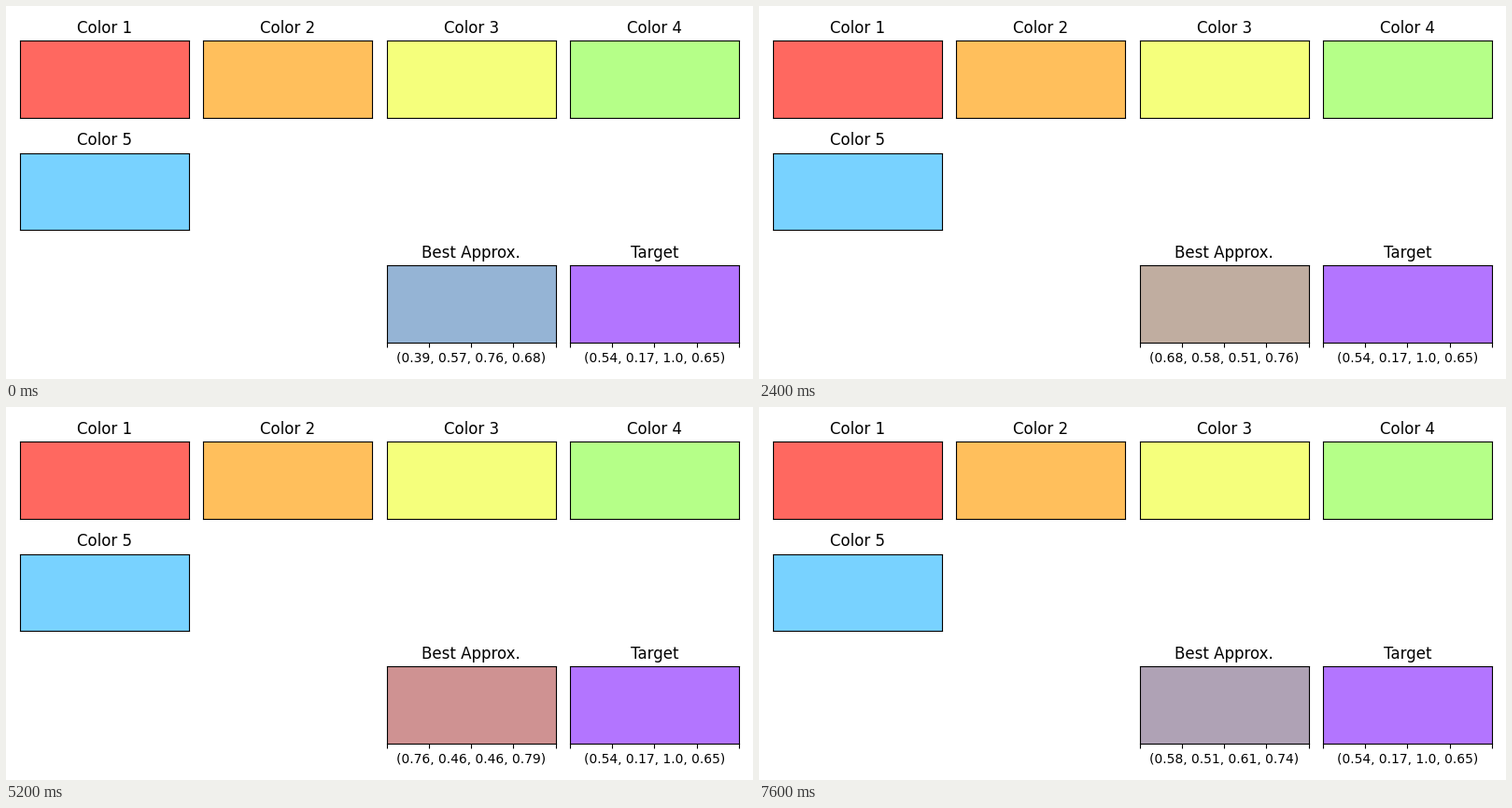
Write a matplotlib script that moves like this. It is 800 px wide and 400 px high and loops after 8000 ms.

```python
import matplotlib.pyplot as plt
from matplotlib.animation import FuncAnimation

WIDTH, HEIGHT, DPI = 800, 400, 100
LEFT, TOP = 15, 37.3
CELL_W, CELL_H = 181.2, 82.75
PITCH_X, PITCH_Y = 196.27, 120.4

PALETTE = ["#ff6860", "#ffbf5c", "#f5ff7c", "#b5ff88", "#78d2ff"]
TARGET = (0.54, 0.17, 1.0, 0.65)

# Best RGBA candidate of each generation.
CANDIDATES = [
    (0.39, 0.57, 0.76, 0.68),
    (0.78, 0.46, 0.44, 0.8),
    (0.8, 0.47, 0.43, 0.81),
    (0.76, 0.48, 0.45, 0.79),
    (0.74, 0.51, 0.47, 0.78),
    (0.72, 0.53, 0.48, 0.77),
    (0.68, 0.58, 0.51, 0.76),
    (0.67, 0.59, 0.51, 0.75),
    (0.64, 0.57, 0.53, 0.76),
    (0.65, 0.61, 0.52, 0.75),
    (0.76, 0.5, 0.48, 0.78),
    (0.77, 0.48, 0.47, 0.79),
    (0.78, 0.47, 0.46, 0.8),
    (0.76, 0.46, 0.46, 0.79),
    (0.77, 0.47, 0.45, 0.78),
    (0.76, 0.48, 0.47, 0.78),
    (0.75, 0.5, 0.46, 0.79),
    (0.61, 0.52, 0.58, 0.75),
    (0.59, 0.51, 0.6, 0.74),
    (0.58, 0.51, 0.61, 0.74),
]

plt.rcParams["font.family"] = "DejaVu Sans"
fig = plt.figure(figsize=(WIDTH / DPI, HEIGHT / DPI), dpi=DPI, facecolor="white")


def add_swatch(row, col, title, color):
    x = LEFT + col * PITCH_X
    bottom = HEIGHT - TOP - row * PITCH_Y - CELL_H
    ax = fig.add_axes([x / WIDTH, bottom / HEIGHT, CELL_W / WIDTH, CELL_H / HEIGHT])
    ax.set(xlim=(0, 1), ylim=(0, 1), xticks=[], yticks=[], facecolor=color)
    ax.set_title(title, fontsize=12)
    return ax


def set_value(ax, rgba):
    ax.set_facecolor(rgba)
    ax.set_xticks([0, 0.25, 0.5, 0.75, 1], ["", "", str(rgba), "", ""])


for i, color in enumerate(PALETTE):
    add_swatch(i // 4, i % 4, f"Color {i + 1}", color)

best_ax = add_swatch(2, 2, "Best Approx.", CANDIDATES[0])
target_ax = add_swatch(2, 3, "Target", TARGET)
set_value(target_ax, TARGET)


def update(frame):
    set_value(best_ax, CANDIDATES[frame])
    return []


anim = FuncAnimation(fig, update, frames=len(CANDIDATES), interval=400,
                     repeat=True, repeat_delay=0, blit=False)
plt.show()
```
